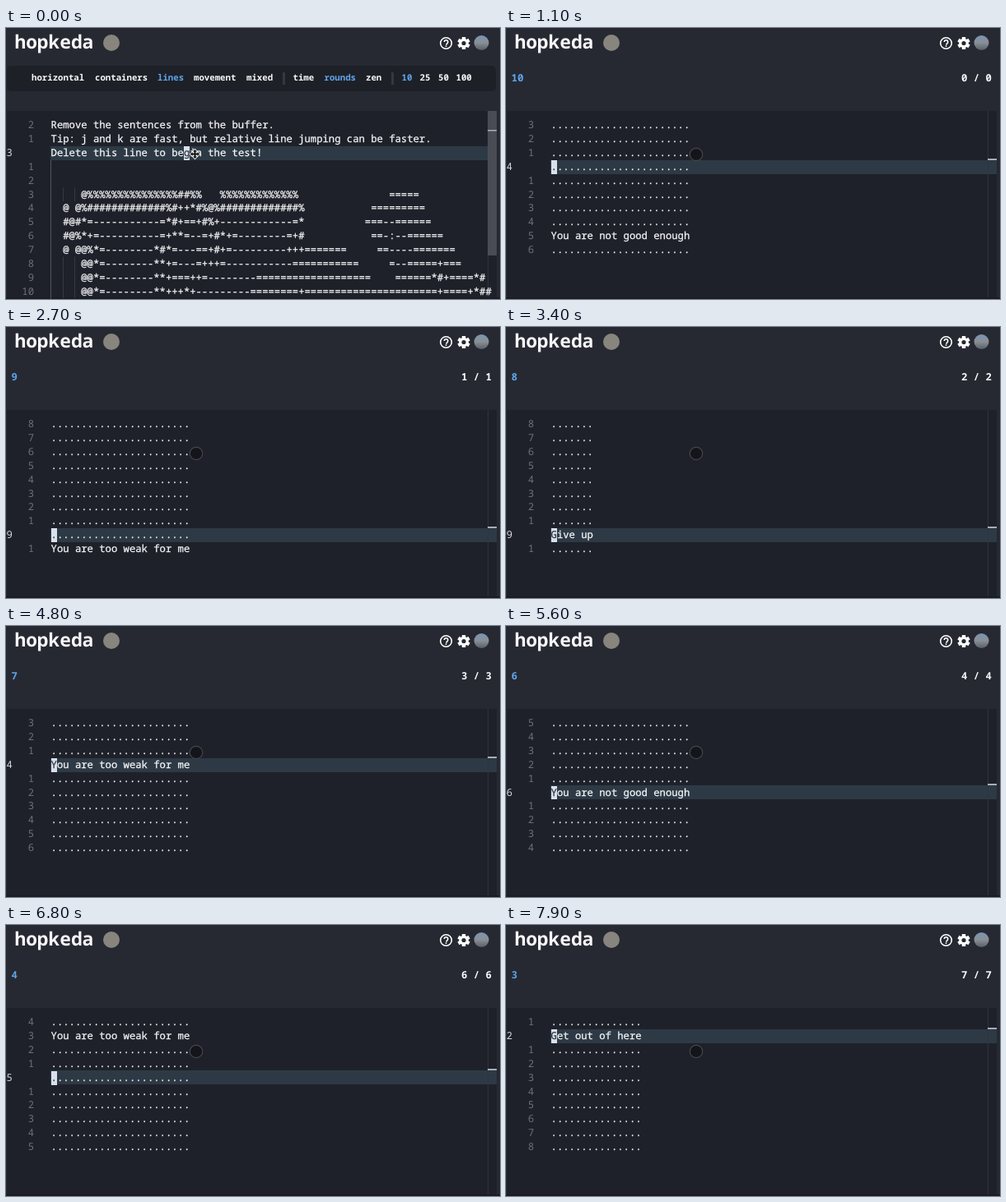
These frames come from a looping animation (600x330 px, 8000 ms). An HTML page with a canvas:

```html
<!DOCTYPE html>
<html lang="en">
<head>
<meta charset="utf-8">
<title>hopkeda</title>
<style>
html, body { margin: 0; width: 100%; height: 100%; overflow: hidden; background: #272932; }
#stage {
  position: relative; width: 600px; height: 330px; overflow: hidden; color: #f8f8fa;
  font: 12.22px "Noto Sans Mono", "DejaVu Sans Mono", monospace;
  text-rendering: geometricPrecision; font-variant-ligatures: none;
}
canvas { position: absolute; left: 0; top: 0; }
#stage div { position: absolute; white-space: pre; }
#title { left: 10.5px; top: 2px; font-size: 22.8px; line-height: 30px; font-weight: 700; }
#menu { left: 0; top: 0; font-size: 10.7px; font-weight: 700; }
#menu div { top: 52px; line-height: 18px; }
#menu .on, #left { color: #5ea5ea; }
#left, #score { top: 52px; line-height: 18px; font-size: 12.3px; font-weight: 700; }
#left { left: 6.5px; }
#score { right: 10px; }
#lines { left: 0; top: .4px; width: 600px; height: 328px; overflow: hidden; }
.row, .num { height: 16.85px; line-height: 16.85px; }
.row { left: 54.6px; font-weight: 500; -webkit-text-stroke: .25px; }
.num { right: 566px; color: #6d7079; }
.num.here { right: auto; left: .5px; color: #d5d8de; }
.caret { background: #d9e0ec; color: #30333d; display: inline-block; height: 16.85px; vertical-align: top; }
</style>
</head>
<body>
<div id="stage">
  <canvas id="back" width="600" height="330"></canvas>
  <div id="title">hopkeda</div>
  <div id="menu"></div>
  <div id="left"></div>
  <div id="score"></div>
  <div id="lines"></div>
  <canvas id="front" width="600" height="330"></canvas>
</div>
<script>
const LOOP = 8000, TOP = 110, STEP = 16.85;
const $ = id => document.getElementById(id);
const back = $('back').getContext('2d'), front = $('front').getContext('2d');

const run = (c, n) => c.repeat(n);
const join = (indent, a, col, b) => (run(' ', indent) + a).padEnd(col) + b;

const intro = [
  'Remove the sentences from the buffer.',
  'Tip: j and k are fast, but relative line jumping can be faster.',
  'Delete this line to begin the test!',
  '', '',
  join(5, '@' + run('%', 15) + '##%%   ' + run('%', 13), 56, '====='),
  join(2, '@ @%' + run('#', 13) + '%#++*#%@%' + run('#', 13) + '%', 53, run('=', 9)),
  join(2, '#@#*=' + run('-', 11) + '=*#+==+#%+' + run('-', 12) + '=*', 52, '===--======'),
  join(2, '#@%*+=' + run('-', 10) + '=+**=--=+#*+=' + run('-', 8) + '=+#', 53, '==-:--======'),
  join(2, '@ @@%*=' + run('-', 8) + '*#*=---==+#+=' + run('-', 9) + '+++' + run('=', 7), 54, '==----======='),
  join(5, '@@*=' + run('-', 8) + '**+=---=+++=' + run('-', 11) + run('=', 11), 56, '=--=====+==='),
  join(5, '@@*=' + run('-', 8) + '**+===++=' + run('-', 8) + run('=', 19), 57, '======*#+====*#'),
  join(5, '@@*=' + run('-', 8) + '**+++*+' + run('-', 9) + run('=', 8) + '+' + run('=', 22), 64, '+====+*##')
];

// at: appears, row: caret row at first, moves: [time, row], cut: line removed
const rounds = [
  { at: 600, text: 'You are not good enough', target: 8, row: 2, cut: 2050,
    moves: [3, 4, 5, 6, 7, 8].map((r, i) => [1060 + i * 155, r]) },
  { at: 2150, text: 'You are too weak for me', target: 9, row: 8, moves: [[2800, 9]], cut: 2950 },
  { at: 3050, text: 'Give up', target: 8, row: 8, moves: [], cut: 3600 },
  { at: 3700, text: 'You are too weak for me', target: 3, row: 8, moves: [[4780, 3]], cut: 4910 },
  { at: 5000, text: 'You are not good enough', target: 5, row: 3, moves: [[5600, 5]], cut: 5800 },
  { at: 5900, text: 'Get out of here', target: 4, row: 5, moves: [[6510, 4]], cut: 6610 },
  { at: 6700, text: 'You are too weak for me', target: 1, row: 4, moves: [[7300, 1]], cut: 7500 },
  { at: 7600, text: 'Get out of here', target: 1, row: 1, moves: [], cut: LOOP }
];

const menu = [
  [31, 'horizontal'], [108, 'containers'], [184, 'lines', 1], [228, 'movement'], [292, 'mixed'],
  [348.5, 'time'], [386.5, 'rounds', 1], [437, 'zen'],
  [480.5, '10', 1], [502.5, '25'], [525, '50'], [546.5, '100']
];

function add(parent, cls, text) {
  const el = document.createElement('div');
  el.className = cls;
  el.textContent = text;
  return parent.appendChild(el);
}

for (const [x, word, on] of menu) add($('menu'), on ? 'on' : '', word).style.left = x + 'px';

function stateAt(t) {
  if (t < rounds[0].at) {
    const cut = t >= 400;
    return { intro: true, cut, rows: intro.filter((_, i) => !cut || i !== 2), row: 2, col: cut ? 0 : 22 };
  }
  const n = rounds.filter(r => t >= r.at).length - 1, r = rounds[n];
  const rows = Array.from({ length: 10 }, (_, i) => i === r.target ? r.text : run('.', r.text.length));
  let row = r.row;
  for (const [time, to] of r.moves) if (t >= time) row = to;
  const cut = t >= r.cut;
  if (cut) {
    rows.splice(r.target, 1);
    row = Math.min(row, rows.length - 1);
  }
  return { n, cut, rows, row, col: 0 };
}

function box(c, color, x, y, w, h) {
  c.fillStyle = color;
  c.fillRect(x, y, w, h);
}

function disc(c, color, x, y, r) {
  c.fillStyle = color;
  c.beginPath();
  c.arc(x, y, r, 0, 7);
  c.fill();
}

function drawGear(c, x, y) {
  c.save();
  c.translate(x, y);
  for (let i = 0; i < 6; i++) {
    c.rotate(Math.PI / 3);
    box(c, '#fff', -2.2, -7.6, 4.4, 4);
  }
  c.restore();
  disc(c, '#fff', x, y, 5.8);
  disc(c, '#272932', x, y, 2.6);
}

function drawHeader(c) {
  disc(c, '#87857e', 128, 18, 10);
  c.strokeStyle = '#fff';
  c.lineWidth = 1.6;
  c.beginPath();
  c.arc(534.5, 18.5, 6.8, 0, 7);
  c.stroke();
  c.beginPath();
  c.arc(534.5, 16.9, 2.2, Math.PI, Math.PI * 2.25);
  c.lineTo(534.5, 20.4);
  c.stroke();
  box(c, '#fff', 533.7, 21.3, 1.6, 1.6);
  drawGear(c, 556, 18.5);
  const sky = c.createLinearGradient(0, 9, 0, 27);
  sky.addColorStop(0, '#7795b8');
  sky.addColorStop(.5, '#8b8f94');
  sky.addColorStop(1, '#55606a');
  disc(c, sky, 577.5, 18, 9);
}

function drawBack(s) {
  const c = back, y = Math.round(TOP + s.row * STEP);
  box(c, '#272932', 0, 0, 600, 330);
  drawHeader(c);
  if (s.intro) {
    c.fillStyle = '#1e2028';
    c.beginPath();
    c.roundRect(1, 46, 594, 31, 5);
    c.fill();
    box(c, '#353842', 336, 54, 3, 15);
    box(c, '#353842', 468, 54, 3, 15);
  }
  box(c, '#1f212a', 1, 101, 595, 227);
  box(c, '#1a1c23', 0, 328, 600, 2);
  box(c, '#2d3a45', 54, y, 542, 17);
  box(c, '#30333c', 585, 101, 1, 227);
  if (s.intro) {
    const first = s.cut ? 2 : 3;
    box(c, '#51545e', 54, TOP + first * STEP, 1, 230);
    for (const x of [69, 83])
      s.rows.forEach((line, i) => {
        if (/^ {5}/.test(line)) box(c, '#363943', x, TOP + i * STEP, 1, STEP);
      });
    box(c, '#494c55', 585, 101, 11, 176);
    box(c, '#a9adb5', 585, 124, 11, 1.5);
  } else {
    box(c, '#a9adb5', 585, y - 2, 11, 2);
  }
}

// four-way arrow pointer
function drawPointer(c, x, y) {
  c.save();
  c.translate(x, y);
  c.beginPath();
  for (let i = 0; i < 4; i++) {
    c.rotate(Math.PI / 2);
    c.moveTo(-1, 0);
    c.lineTo(-1, -3);
    c.lineTo(-2.6, -3);
    c.lineTo(0, -5.6);
    c.lineTo(2.6, -3);
    c.lineTo(1, -3);
    c.lineTo(1, 0);
  }
  c.restore();
  c.lineWidth = 1.5;
  c.strokeStyle = '#fff';
  c.stroke();
  c.fillStyle = '#0c0d10';
  c.fill();
}

function drawFront(t) {
  const c = front;
  c.clearRect(0, 0, 600, 330);
  if (t < 100) return drawPointer(c, 229.5, 153.5);
  disc(c, '#45464b', 231, 154, 8.3);
  disc(c, '#14151b', 231, 154, 7.1);
}

function fillLines(s) {
  const host = $('lines');
  host.textContent = '';
  s.rows.forEach((line, i) => {
    const here = i === s.row, top = TOP + i * STEP + 'px';
    const num = add(host, here ? 'num here' : 'num', here ? i + 1 : Math.abs(i - s.row));
    const row = add(host, 'row', here ? '' : line);
    num.style.top = row.style.top = top;
    if (!here) return;
    const caret = document.createElement('span');
    caret.className = 'caret';
    caret.textContent = line[s.col] || ' ';
    row.append(line.slice(0, s.col), caret, line.slice(s.col + 1));
  });
}

function show(s) {
  $('menu').style.display = s.intro ? '' : 'none';
  $('left').textContent = s.intro ? '' : 10 - s.n;
  $('score').textContent = s.intro ? '' : s.n + ' / ' + s.n;
  drawBack(s);
  fillLines(s);
}

let last = '';
function frame() {
  const t = performance.now() % LOOP, s = stateAt(t);
  const key = [s.n, s.cut, s.row].join();
  if (key !== last) show(s);
  last = key;
  drawFront(t);
  requestAnimationFrame(frame);
}
frame();
</script>
</body>
</html>
```
